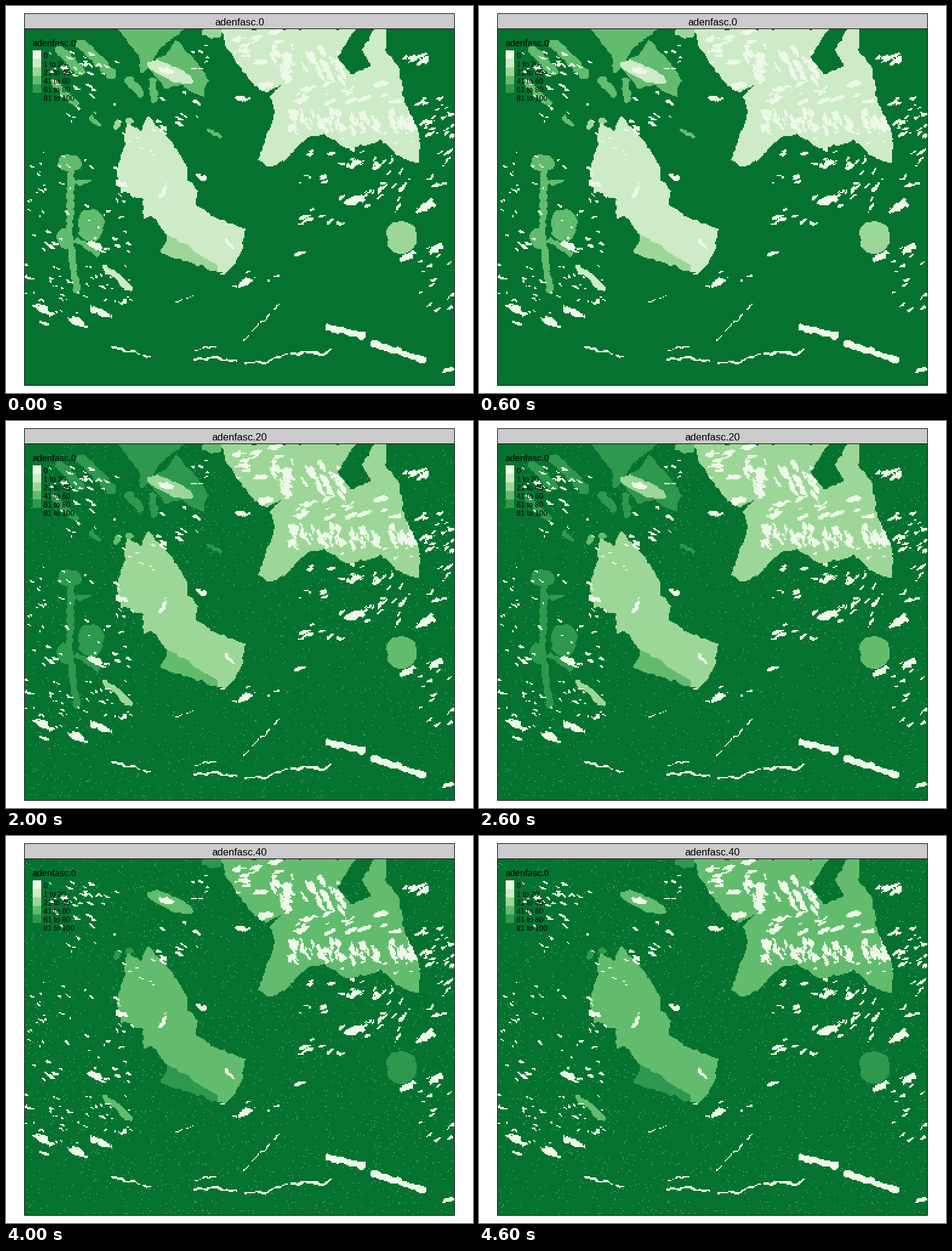
A matplotlib script that plays this animation: 770x637 px, repeating every 5000 ms.

```python
import numpy as np
import matplotlib.pyplot as plt
from matplotlib.animation import FuncAnimation
from matplotlib.patches import Rectangle
from matplotlib.path import Path

W, H, DPI = 770, 637, 100
LEFT, TOP, RIGHT, BOTTOM, CELL = 31, 38, 739, 624, 2
PALETTE = np.array([[237, 248, 233], [205, 235, 199], [157, 215, 151],
                    [99, 188, 110], [47, 152, 79], [6, 114, 48]], dtype=np.uint8)
LABELS = ["0"] + [f"{lo + 1} to {lo + 20}" for lo in range(0, 100, 20)]

# A stand climbs one class every second step; offsets set its start and phase.
FOREST, NORTH, YOUNG, MID, ROUND, OLD, BARE = range(7)
PHASE = {NORTH: 2, YOUNG: 3, MID: 4, ROUND: 5, OLD: 6}

rng = np.random.default_rng(12)
gx, gy = np.meshgrid(np.arange(LEFT + 1, RIGHT, CELL), np.arange(TOP + 1, BOTTOM, CELL))


def noise(passes):
    """Smooth random field with unit deviation."""
    n = rng.normal(size=gx.shape)
    for _ in range(passes):
        for axis in (0, 1):
            n = (np.roll(n, 1, axis) + n + np.roll(n, -1, axis)) / 3
    return n / n.std()


# Ragged edges come from measuring every shape in warped coordinates.
wx, wy, rough = gx + noise(3), gy + noise(3), noise(1)
stand = np.full(gx.shape, FOREST)
bare = np.zeros(gx.shape, bool)


def poly(*points):
    cells = np.column_stack([wx.ravel(), wy.ravel()])
    return Path(points).contains_points(cells).reshape(gx.shape)


def oval(x, y, a, b, deg=0, ragged=0.0):
    t = np.radians(deg)
    dx, dy = wx - x, wy - y
    u = (dx * np.cos(t) + dy * np.sin(t)) / a
    v = (dy * np.cos(t) - dx * np.sin(t)) / b
    return u * u + v * v < 1 + ragged * rough


def line(width, *points):
    mask = np.zeros(gx.shape, bool)
    for (x0, y0), (x1, y1) in zip(points, points[1:]):
        dx, dy = x1 - x0, y1 - y0
        t = np.clip(((wx - x0) * dx + (wy - y0) * dy) / (dx * dx + dy * dy), 0, 1)
        mask |= np.hypot(wx - x0 - t * dx, wy - y0 - t * dy) < width + 0.4 * rough
    return mask


def grow(kind, *masks):
    for mask in masks:
        stand[mask] = kind


def clear(x, y, size, lean=None, within=True):
    """Bare patch; by default patches dip inwards from both sides of the map."""
    if lean is None:
        lean = 28 * np.cos(np.pi * (x - LEFT) / (RIGHT - LEFT))
    bare[oval(x, y, size, max(1.3, 0.36 * size), lean, 0.3) & within] = True


def scatter(x, y, rx, ry, n, size, lean=None, within=True):
    for _ in range(n):
        clear(x + rng.uniform(-rx, rx), y + rng.uniform(-ry, ry),
              size * rng.uniform(0.5, 1.5), lean, within)


# North-west
grow(OLD,
     poly((183, 37), (296, 37), (252, 72), (236, 100), (222, 112), (218, 82)),
     poly((282, 55), (313, 90), (332, 122), (326, 152), (290, 130), (262, 136),
          (232, 100), (262, 78)),
     line(7, (203, 124), (220, 142)), line(6, (242, 124), (244, 154)),
     line(8, (124, 62), (174, 112)), line(8, (88, 72), (122, 106)),
     line(6, (80, 126), (114, 160)), line(3, (141, 183), (153, 197)),
     line(3, (333, 203), (354, 215)))
grow(YOUNG, oval(270, 109, 42, 12, 22))
grow(MID, oval(341, 38, 18, 16))

# West and east
grow(OLD, line(6, (108, 255), (104, 380), (117, 468)), oval(105, 258, 20, 14),
     oval(98, 384, 14, 17), oval(140, 361, 22, 27), oval(125, 290, 13, 5),
     line(5, (118, 385), (152, 408)))
grow(YOUNG, line(5, (162, 430), (180, 443), (204, 465)))
grow(ROUND, oval(652, 381, 26, 27))

# Large stand in the north-east, split into two ages
big = poly((355, 37), (360, 62), (384, 98), (410, 132), (432, 143), (452, 131), (436, 150),
           (444, 176), (416, 252), (430, 265), (458, 257), (495, 218), (525, 211),
           (560, 236), (620, 222), (648, 247), (681, 261), (682, 213), (656, 150),
           (650, 105), (627, 72), (627, 37), (608, 37), (588, 72), (600, 100), (570, 113),
           (547, 85), (576, 37))
grow(YOUNG, big)
grow(NORTH, big & (wx < 580) & (wy < np.interp(wx, [437, 455, 475, 549], [138, 75, 73, 92])))

# Central stand with an older southern edge
central = poly((235, 181), (272, 222), (299, 265), (300, 287), (318, 305), (310, 326),
               (345, 347), (394, 367), (389, 405), (362, 441), (256, 407), (267, 378),
               (240, 346), (226, 350), (227, 318), (190, 306), (182, 270), (194, 235),
               (198, 192), (224, 207))
grow(YOUNG, central)
grow(MID, central & (wx < 348) & (wy > 375 + 0.65 * (wx - 267)),
     oval(202, 189, 8, 5), oval(182, 195, 5, 8))
grow(NORTH, oval(230, 200, 4, 9))

# Bare streaks fan out across the large stand and crowd along one band
scatter(410, 68, 38, 26, 18, 8, -12, big)
scatter(500, 94, 60, 30, 28, 9, 60, big)
scatter(425, 132, 10, 6, 6, 8, 0, big)
scatter(550, 142, 100, 20, 30, 7, -20, big)
for x in (485, 537, 591, 655):
    scatter(x, 188, 22, 15, 22, 7, 65, big)
scatter(600, 215, 85, 16, 16, 4, -10, big)

# Small patches elsewhere: north, east, then west
scatter(130, 112, 58, 38, 30, 5)
scatter(145, 178, 45, 28, 8, 4)
scatter(280, 175, 45, 36, 12, 5, 30)
scatter(318, 85, 24, 24, 8, 4)
scatter(708, 186, 32, 36, 30, 5)
scatter(672, 88, 18, 7, 6, 8)
scatter(575, 285, 90, 50, 28, 4.5)
scatter(640, 300, 36, 50, 14, 5, -50)
scatter(712, 270, 25, 40, 8, 5)
scatter(520, 354, 36, 9, 8, 6)
scatter(705, 445, 32, 55, 14, 5)
scatter(70, 290, 36, 58, 22, 3)
scatter(172, 330, 42, 78, 24, 4)
scatter(65, 388, 32, 18, 7, 5)
scatter(120, 458, 88, 32, 46, 3.2)
scatter(90, 500, 50, 25, 7, 5)
scatter(218, 225, 28, 24, 6, 4)
scatter(410, 448, 70, 14, 6, 4)

# Larger clearings
for x, y, size in ((60, 498, 19), (155, 503, 18), (118, 520, 18), (192, 488, 8),
                   (147, 394, 15), (190, 292, 12), (264, 106, 13), (322, 282, 10),
                   (388, 152, 13), (575, 259, 14), (578, 319, 18), (610, 265, 10),
                   (693, 330, 18), (709, 400, 13), (662, 413, 14), (485, 407, 9),
                   (728, 240, 10), (728, 599, 12)):
    clear(x, y, size)
clear(396, 455, 14, -25)
clear(258, 306, 12, 110)
clear(368, 391, 10, 45)

# Southern ridges
for width, *points in ((5.5, (605, 555), (645, 568), (686, 582)),
                       (5, (531, 529), (560, 536), (588, 543)),
                       (1.5, (175, 562), (238, 577)),
                       (1.8, (310, 583), (345, 578), (378, 585)),
                       (1.8, (396, 586), (425, 586), (464, 573)),
                       (2, (474, 573), (490, 570), (525, 574), (536, 564)),
                       (0.9, (392, 551), (420, 522), (452, 489)),
                       (0.9, (310, 566), (345, 561)), (0.9, (281, 487), (308, 477))):
    bare |= line(width, *points)
stand[bare] = BARE


def picture(age):
    classes = np.full(gx.shape, 5)
    for kind, phase in PHASE.items():
        classes[stand == kind] = (phase + age) // 2
    specks = np.random.default_rng(40 + age).random(gx.shape) < 0.012 * np.sqrt(age)
    classes[specks & (classes == 5)] = 4
    classes[stand == BARE] = 0
    return PALETTE[classes]


fig = plt.figure(figsize=(W / DPI, H / DPI), dpi=DPI, facecolor="white")
ax = fig.add_axes([0, 0, 1, 1])
maps = [picture(age) for age in range(5)]
image = ax.imshow(maps[0], extent=(LEFT, RIGHT, BOTTOM, TOP), interpolation="nearest",
                  aspect="auto")
ax.set_xlim(0, W)
ax.set_ylim(H, 0)
ax.axis("off")


def box(x, y, w, h, face, edge="none"):
    ax.add_patch(Rectangle((x, y), w, h, facecolor=face, edgecolor=edge,
                           linewidth=72 / DPI, snap=False, zorder=3))


def write(x, y, text, px, ha="left"):
    return ax.text(x, y, text, fontsize=px * 72 / DPI, family="Liberation Sans",
                   ha=ha, va="baseline", zorder=4)


box(30.5, 12.5, 709, 25, "#cccccc", "black")
box(30.5, 37.5, 709, 587, "none", "black")
write(43, 66, "adenfasc.0", 14.7)
for i, label in enumerate(LABELS):
    box(44, 73 + 14 * i, 14, 14, PALETTE[i] / 255)
    write(62, 86 + 14 * i, label, 12.1)
title = write(385, 32, "", 16.6, "center")


def update(age):
    image.set_data(maps[age])
    title.set_text(f"adenfasc.{10 * age}")
    return image, title


anim = FuncAnimation(fig, update, frames=5, interval=1000, repeat=True, repeat_delay=0)
plt.show()
```
